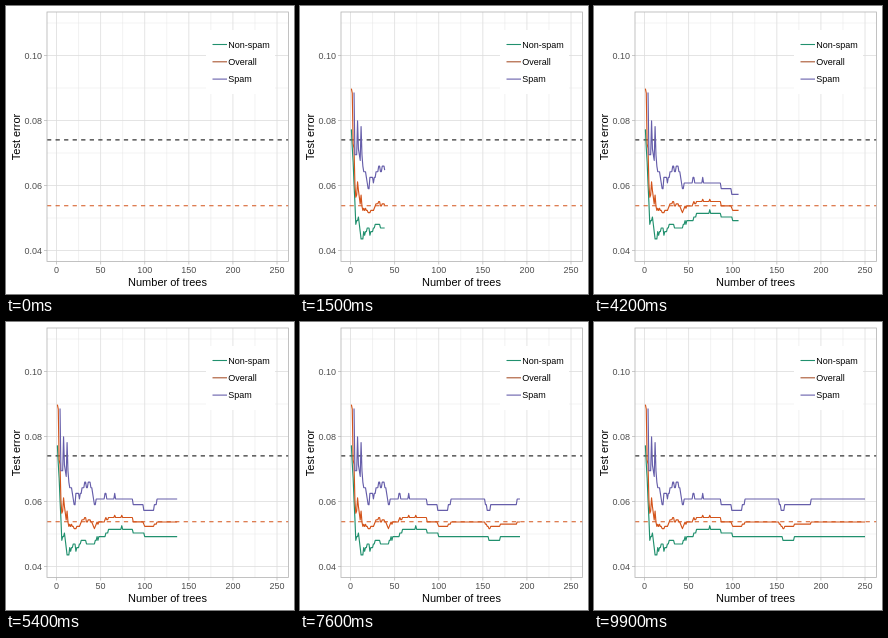
These frames come from a looping animation (288x288 px, 10 s). An HTML page:

```html
<!DOCTYPE html>
<html lang="en">
<head>
<meta charset="utf-8">
<title>Test error by number of trees</title>
<style>
html, body { margin: 0; width: 100%; height: 100%; overflow: hidden; background: #fff; }
svg { display: block; width: 288px; height: 288px; }
text { font-family: "Liberation Sans", Arial, sans-serif; font-size: 9px; }
.tick { fill: #4d4d4d; }
.title { font-size: 11px; text-anchor: middle; }
.series { fill: none; stroke-width: 1.15; stroke-linejoin: round; }
</style>
</head>
<body>
<svg id="plot" viewBox="0 0 288 288"></svg>
<script>
const plot = document.getElementById("plot");
const GREEN = "#21906e", ORANGE = "#d3541b", PURPLE = "#665eaa";
const LEFT = 41, RIGHT = 282.5, TOP = 6, BOTTOM = 255.5, TREES = 250;
const xOf = trees => 50.5 + trees * 0.882;
const yOf = error => 374.5 - error * 3250;

function add(tag, attrs, text = "") {
  const el = document.createElementNS("http://www.w3.org/2000/svg", tag);
  for (const key in attrs) el.setAttribute(key, attrs[key]);
  el.textContent = text;
  return plot.appendChild(el);
}
const line = (x1, y1, x2, y2, stroke, width, extra) =>
  add("line", { x1, y1, x2, y2, stroke, "stroke-width": width, ...extra });

// Grid, ticks and axis labels
for (let n = 0; n <= TREES; n += 25) {
  const x = xOf(n), major = n % 50 === 0;
  line(x, TOP, x, BOTTOM, "#dedede", major ? 0.8 : 0.4);
  if (!major) continue;
  line(x, BOTTOM, x, BOTTOM + 3, "#b3b3b3", 0.7);
  add("text", { x, y: 267, class: "tick", "text-anchor": "middle" }, n);
}
for (let i = 4; i <= 11; i++) {
  const y = yOf(i / 100), major = i % 2 === 0;
  line(LEFT, y, RIGHT, y, "#dedede", major ? 0.8 : 0.4);
  if (!major) continue;
  line(LEFT - 3, y, LEFT, y, "#b3b3b3", 0.7);
  add("text", { x: 36, y: y + 3.3, class: "tick", "text-anchor": "end" }, (i / 100).toFixed(2));
}
add("text", { x: 161.5, y: 280, class: "title" }, "Number of trees");
add("text", { class: "title", transform: "translate(13.5 131) rotate(-90)" }, "Test error");

for (const [y, color] of [[133.9, "#333"], [199.8, ORANGE]])
  line(LEFT, y, RIGHT, y, color, 1.1, { "stroke-dasharray": "4.27 4.27" });

function randomFrom(seed) {
  return () => (seed = seed * 16807 % 2147483647) / 2147483647;
}

// Trend through key points plus fading jitter, in whole steps of one message
function errorCurve(keys, base, step, seed) {
  const random = randomFrom(seed), heights = [];
  let jitter = 0;
  for (let n = 1, k = 0; n <= TREES; n++) {
    while (k < keys.length - 2 && keys[k + 1][0] <= n) k++;
    const [n0, y0] = keys[k], [n1, y1] = keys[k + 1];
    const trend = y0 + (y1 - y0) * (n - n0) / (n1 - n0);
    if (random() < 0.6) jitter = random() * 2 - 1;
    const amount = n < 14 ? 0 : 0.4 + 1.4 * Math.exp(-n / 30);
    heights[n] = base + step * Math.round((trend - base) / step + jitter * amount);
  }
  return heights;
}

const nonSpam = errorCurve([
  [1, 125], [3, 158], [6, 217], [9, 211], [12, 232], [20, 226], [32, 220], [45, 219],
  [62, 207.4], [84, 207.4], [92, 212], [106, 214.6], [155, 214.6], [157, 218.3],
  [168, 218.3], [171, 214.6], [250, 214.6]
], 218.3, 3.65, 11);
const spam = errorCurve([
  [1, 16], [2, 3], [3, 112], [4, 87], [5, 147], [7, 150], [8, 117], [9, 144], [11, 157],
  [12, 122], [13, 148], [19, 178], [38, 159], [43, 177], [82, 177], [96, 183],
  [101, 188], [109, 188], [114, 177], [152, 177], [155, 188], [164, 183], [188, 183],
  [190, 177], [250, 177]
], 177, 5.65, 7);
// The overall rate weights both classes by their share of messages
const overall = nonSpam.map((y, n) => 0.61 * y + 0.39 * spam[n]);

const curves = [[nonSpam, GREEN, 1], [overall, ORANGE, 1], [spam, PURPLE, 4]].map(
  ([heights, stroke, first]) => ({ heights, first, path: add("path", { class: "series", stroke }) }));

add("rect", { x: LEFT, y: TOP, width: RIGHT - LEFT, height: BOTTOM - TOP, fill: "none", stroke: "#b3b3b3", "stroke-width": 0.8 });

// Legend
add("rect", { x: 200, y: 24, width: 69, height: 64, fill: "#fff" });
[["Non-spam", GREEN], ["Overall", "#a8552f"], ["Spam", PURPLE]].forEach(([name, color], i) => {
  const y = 38.5 + i * 17.3;
  line(206.5, y, 221, y, color, 1.1);
  add("text", { x: 222.3, y: y + 3.3 }, name);
});

// Shows each curve up to a fractional tree count
function reveal(end) {
  for (const { heights, first, path } of curves) {
    const points = [];
    for (let n = first; n <= end; n++) points.push([n, heights[n]]);
    const whole = Math.floor(end), part = end - whole;
    if (whole >= first && whole < TREES)
      points.push([end, heights[whole] * (1 - part) + heights[whole + 1] * part]);
    path.setAttribute("d", points.map(([n, y], i) =>
      `${i ? "L" : "M"}${xOf(n).toFixed(2)} ${y.toFixed(2)}`).join(""));
  }
}

const start = performance.now();
function draw() {
  const step = Math.floor(Math.max(0, performance.now() - start) % 10000 / 100);
  reveal(1 + step * (TREES - 1) / 99);
  requestAnimationFrame(draw);
}
draw();
</script>
</body>
</html>
```
